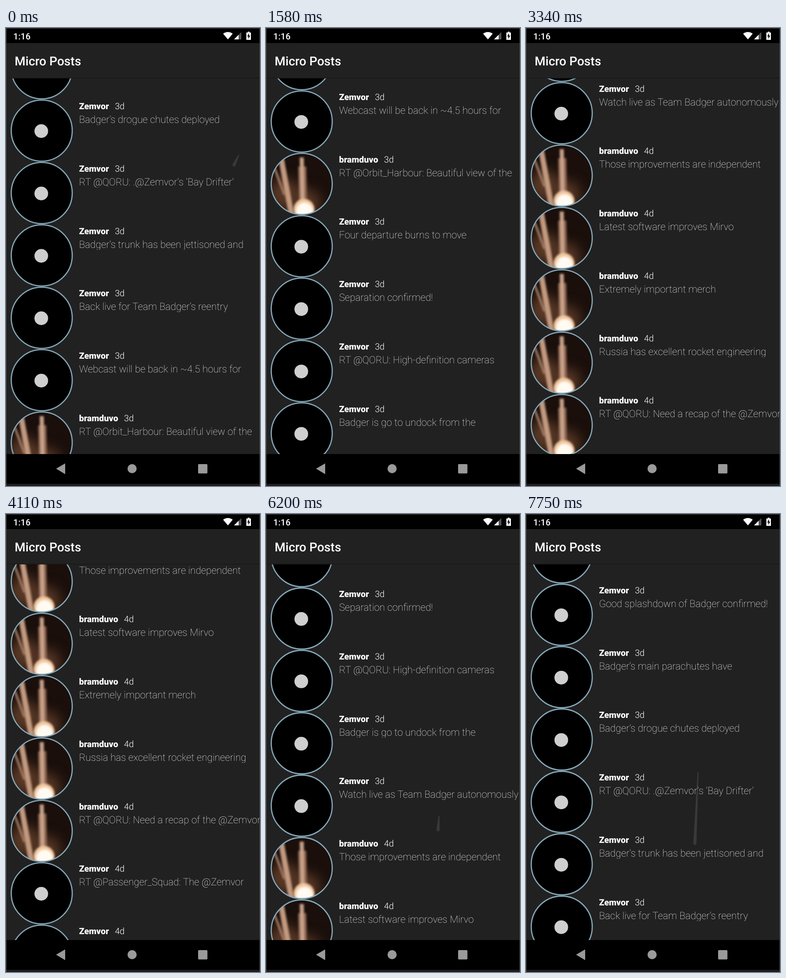
An HTML page with a canvas for the animation above (8 s loop, 558 by 1004 pixels).

```html
<!DOCTYPE html>
<html lang="en">
<head>
<meta charset="utf-8">
<title>Micro Posts</title>
<style>
  html, body { margin: 0; width: 100%; height: 100%; overflow: hidden; background: #212121; }
  canvas { display: block; }
</style>
</head>
<body>
<canvas id="stage" width="558" height="1004"></canvas>
<script>
const screen2d = document.getElementById('stage').getContext('2d');
let ctx = screen2d;
const LOOP = 8000, WIDTH = 558, HEIGHT = 1004;
const PITCH = 136.75, LIST_TOP = 110, LIST_BOTTOM = 934;
const RADIUS = 67, TEXT_X = 160.5, GREY = '#9a9a9a';
const LAB = 'Zemvor', FAN = 'bramduvo';

const messages = [
  'Good splashdown of Badger confirmed!',
  'Badger’s main parachutes have',
  'Badger’s drogue chutes deployed',
  "RT @QORU: .@Zemvor's 'Bay Drifter'",
  "Badger's trunk has been jettisoned and",
  'Back live for Team Badger’s reentry',
  'Webcast will be back in ~4.5 hours for',
  'RT @Orbit_Harbour: Beautiful view of the',
  'Four departure burns to move',
  'Separation confirmed!',
  'RT @QORU: High-definition cameras',
  'Badger is go to undock from the',
  'Watch live as Team Badger autonomously',
  'Those improvements are independent',
  'Latest software improves Mirvo',
  'Extremely important merch',
  'Russia has excellent rocket engineering',
  'RT @QORU: Need a recap of the @Zemvor',
  'RT @Passenger_Squad: The @Zemvor',
  ''
];
const authorOf = i => i === 7 || (i >= 13 && i <= 17) ? FAN : LAB;
const ageOf = i => i < 13 ? '3d' : '4d';

// The screen refreshes only at these times and holds in between
const refreshes = [0, 260, 680, 1120, 1580, 1870, 2220, 2760, 3340, 3680, 4110,
  4520, 5640, 5760, 6200, 6560, 7180, 7750];

// Ends of the swipes: time, and the post that then sits at the top of the list
const swipes = [[0, 2], [680, 2.58], [2220, 7.07], [4110, 13.565], [5640, 13.3],
  [6200, 8.97], [6560, 7.42], [7750, 0.03]];

// Touch trails: start, end, tail x and y, head x and y
const touches = [
  [0, 260, 511, 279, 501, 300],
  [4520, 4850, 396, 540, 394, 569],
  [6200, 6560, 380, 663, 378, 692],
  [7750, LOOP, 378, 567, 371, 722]
];

function scrollAt(time) {
  const next = swipes.findIndex(swipe => swipe[0] > time);
  if (next < 0) return swipes.at(-1)[1];
  const [t0, from] = swipes[next - 1], [t1, to] = swipes[next];
  return from + (to - from) * Math.sin((time - t0) / (t1 - t0) * Math.PI / 2);
}

function text(string, x, y, size, weight) {
  ctx.font = `${weight} ${size}px Roboto, sans-serif`;
  ctx.fillStyle = '#fff';
  ctx.fillText(string, x, y);
  return ctx.measureText(string).width;
}

function rect(color, x, y, w, h) {
  ctx.fillStyle = color;
  ctx.fillRect(x, y, w, h);
}

function disc(color, x, y, r) {
  ctx.fillStyle = color;
  ctx.beginPath();
  ctx.arc(x, y, r, 0, 2 * Math.PI);
  ctx.fill();
}

function poly(color, ...points) {
  ctx.fillStyle = color;
  ctx.beginPath();
  for (let i = 0; i < points.length; i += 2) ctx.lineTo(points[i], points[i + 1]);
  ctx.fill();
}

function line(color, width, x0, y0, x1, y1) {
  ctx.strokeStyle = color;
  ctx.lineWidth = width;
  ctx.beginPath();
  ctx.moveTo(x0, y0);
  ctx.lineTo(x1, y1);
  ctx.stroke();
}

function clipped(x, y, w, h, paint) {
  ctx.save();
  ctx.beginPath();
  ctx.rect(x, y, w, h);
  ctx.clip();
  paint();
  ctx.restore();
}

// A night launch in soft flat tones, painted once
function paintPhoto() {
  const photo = document.createElement('canvas');
  photo.width = photo.height = 2 * RADIUS;
  ctx = photo.getContext('2d');
  ctx.translate(RADIUS, RADIUS);
  rect('#1a0f0b', -RADIUS, -RADIUS, 2 * RADIUS, 2 * RADIUS);
  ctx.filter = 'blur(14px)';
  disc('#5c3b28', -38, 22, 34);
  disc('#5c3b28', 10, 42, 30);
  ctx.filter = 'blur(2px)';
  line('#a67d66', 5, -64, -46, -38, 24);
  line('#c39a80', 12, -46, -60, -22, 70);
  line('#8a6350', 18, 1, -38, 3, 42);
  line('#c8a28a', 9, 0, -58, 2, 40);
  disc('#f3c9a0', 5, 56, 23);
  disc('#fffaf2', 6, 59, 18);
  ctx = screen2d;
  return photo;
}

function avatar(author, y) {
  ctx.save();
  ctx.translate(78.5, y);
  ctx.beginPath();
  ctx.arc(0, 0, RADIUS, 0, 2 * Math.PI);
  ctx.save();
  ctx.clip();
  if (author === FAN) {
    ctx.drawImage(photo, -RADIUS, -RADIUS);
  } else {
    rect('#000', -RADIUS, -RADIUS, 2 * RADIUS, 2 * RADIUS);
  }
  ctx.restore();
  ctx.strokeStyle = '#86a9ba';
  ctx.lineWidth = 2.6;
  ctx.stroke();
  if (author === LAB) disc('#cfcfcf', -1, 1, 15);
  ctx.restore();
}

function post(i, y) {
  avatar(authorOf(i), y);
  const width = text(authorOf(i), TEXT_X, y - 47, 19, 900);
  text(ageOf(i), TEXT_X + width + 13, y - 47, 19.3, 300);
  clipped(150, y - 48, 408, 35.5, () => text(messages[i], TEXT_X, y - 17, 21.75, 100));
}

function trail(x0, y0, x1, y1) {
  const angle = Math.atan2(y1 - y0, x1 - x0), quarter = Math.PI / 2;
  ctx.fillStyle = 'rgba(255,255,255,.11)';
  ctx.beginPath();
  ctx.arc(x0, y0, 1.2, angle + quarter, angle - quarter);
  ctx.arc(x1, y1, 3.4, angle - quarter, angle + quarter);
  ctx.fill();
}

function statusBar() {
  rect('#000', 0, 0, WIDTH, 33);
  text('1:16', 16, 24.5, 19.2, 500);
  ctx.beginPath();
  ctx.moveTo(487.5, 25);
  ctx.lineTo(477, 12.5);
  ctx.quadraticCurveTo(487.5, 5, 498, 12.5);
  ctx.fill();
  poly('#555', 517, 9, 517, 25, 501, 25);
  poly('#fff', 511, 15, 511, 25, 501, 25);
  rect('#fff', 528, 10, 10, 16);
  rect('#fff', 531, 8, 4, 2);
  poly('#000', 534, 11.5, 529.7, 18.5, 532.4, 18.5, 532.4, 24, 536.5, 16.8, 534, 16.8);
}

function navigationBar() {
  rect('#000', 0, LIST_BOTTOM, WIDTH, 65);
  rect('#1d1d1d', 0, 999, WIDTH, 5);
  poly(GREY, 110, 966, 130, 954.5, 130, 978);
  disc(GREY, 277, 966, 10);
  ctx.beginPath();
  ctx.roundRect(422, 956, 20.5, 20.5, 2);
  ctx.fill();
}

function draw(time) {
  const scroll = scrollAt(refreshes.findLast(t => t <= time));
  const centre = i => 225 + (i - scroll) * PITCH;
  rect('#212121', 0, 0, WIDTH, HEIGHT);

  clipped(0, LIST_TOP, WIDTH, LIST_BOTTOM - LIST_TOP, () => {
    avatar(LAB, centre(-1));
    messages.forEach((_, i) => post(i, centre(i)));
  });

  rect('#191919', 0, 109, WIDTH, 1.5);
  text('Micro Posts', 19, 82, 27.15, 500);
  statusBar();
  navigationBar();
  for (const [from, to, ...path] of touches) {
    if (time >= from && time < to) trail(...path);
  }
  ctx.strokeStyle = '#4c4c4c';
  ctx.lineWidth = 1;
  ctx.strokeRect(0.5, 0.5, WIDTH - 1, HEIGHT + 1);
}

const photo = paintPhoto();
ctx.textRendering = 'geometricPrecision';
const start = performance.now();
function frame() {
  draw((performance.now() - start) % LOOP);
  requestAnimationFrame(frame);
}
frame();
</script>
</body>
</html>
```
